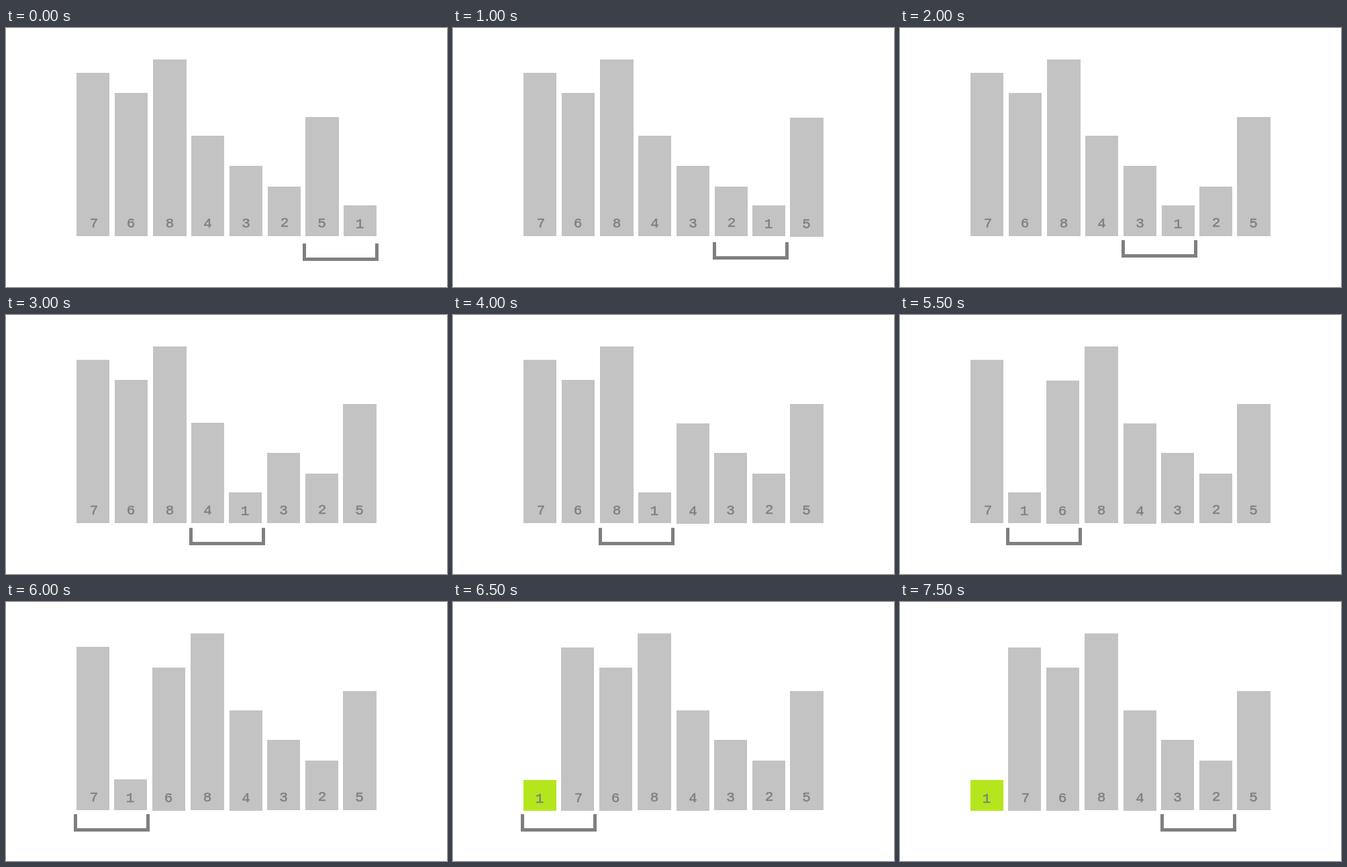
Write an HTML page that moves like this. It is 657 px wide and 387 px high and loops after 8 s.

```html
<!DOCTYPE html>
<html lang="en">
<head>
<meta charset="utf-8">
<title>Bubble sort</title>
<style>
  html, body { margin: 0; width: 100%; height: 100%; overflow: hidden; background: #fff; }
  svg { display: block; }
  rect { fill: #c3c3c3; shape-rendering: crispEdges; }
  text {
    font: 21px "Liberation Mono", "Courier New", monospace;
    text-anchor: middle;
    fill: #7f7f7f;
    stroke: #7f7f7f;
    stroke-width: .5;
  }
  path { fill: none; stroke: #7f7f7f; stroke-width: 5; shape-rendering: crispEdges; }
</style>
</head>
<body>
<svg id="stage" width="657" height="387" viewBox="0 0 657 387"></svg>
<script>
const STEP = 500, STEPS = 16, FLOOR = 311;

// path entries: [first step, x, y offset]
const bars = [
  { n: 7, top: 67, w: 49, tx: 26, ty: 298, path: [[0, 105, 0], [13, 161, 1]] },
  { n: 6, top: 97, w: 49, tx: 24, ty: 298, path: [[0, 162, 0], [11, 218, 1]] },
  { n: 8, top: 47, w: 50, tx: 25, ty: 298, path: [[0, 219, 0], [9, 275, 0]] },
  { n: 4, top: 161, w: 49, tx: 24.5, ty: 298, path: [[0, 276, 0], [7, 333, 1]] },
  { n: 3, top: 206, w: 49, tx: 24.5, ty: 298, path: [[0, 333, 0], [5, 389, 0]] },
  { n: 2, top: 237, w: 49, tx: 25, ty: 297, path: [[0, 390, 0], [3, 446, 0]] },
  { n: 5, top: 133, w: 50, tx: 24.5, ty: 298, path: [[0, 446, 0], [1, 502, 1], [3, 502, 0]] },
  { n: 1, top: 265, w: 49, tx: 24, ty: 299, path: [
    [0, 503, 0], [1, 446, 0], [3, 390, 0], [5, 332, 0],
    [7, 276, 0], [9, 218, 0], [11, 161, 0], [13, 105, 1]] }
];

// [first step, left, top]
const bracketPath = [
  [0, 442, 322], [2, 387, 320], [4, 330, 317], [6, 273, 318], [8, 217, 318],
  [9, 213, 319], [10, 158, 318], [12, 101, 317], [14, 444, 318], [15, 388, 317]
];

const stage = document.getElementById("stage");

function add(parent, tag, attrs = {}) {
  const el = document.createElementNS("http://www.w3.org/2000/svg", tag);
  for (const key in attrs) el.setAttribute(key, attrs[key]);
  return parent.appendChild(el);
}

function place(el, path, step) {
  const [, x, y] = path.filter(p => p[0] <= step).pop();
  el.setAttribute("transform", `translate(${x} ${y})`);
}

for (const bar of bars) {
  bar.el = add(stage, "g");
  bar.rect = add(bar.el, "rect", { y: bar.top, width: bar.w, height: FLOOR - bar.top });
  add(bar.el, "text", { x: bar.tx, y: bar.ty }).textContent = bar.n;
}
const bracket = add(stage, "path", { d: "M2.5 0V23.5H110.5V0" });
const smallest = bars[7];

let shown = -1;
function draw(now) {
  const step = Math.floor(now / STEP) % STEPS;
  if (step !== shown) {
    shown = step;
    for (const bar of bars) place(bar.el, bar.path, step);
    place(bracket, bracketPath, step);
    smallest.rect.style.fill = step >= 13 ? "#b5e61d" : "";
  }
  requestAnimationFrame(draw);
}
draw(0);
</script>
</body>
</html>
```
